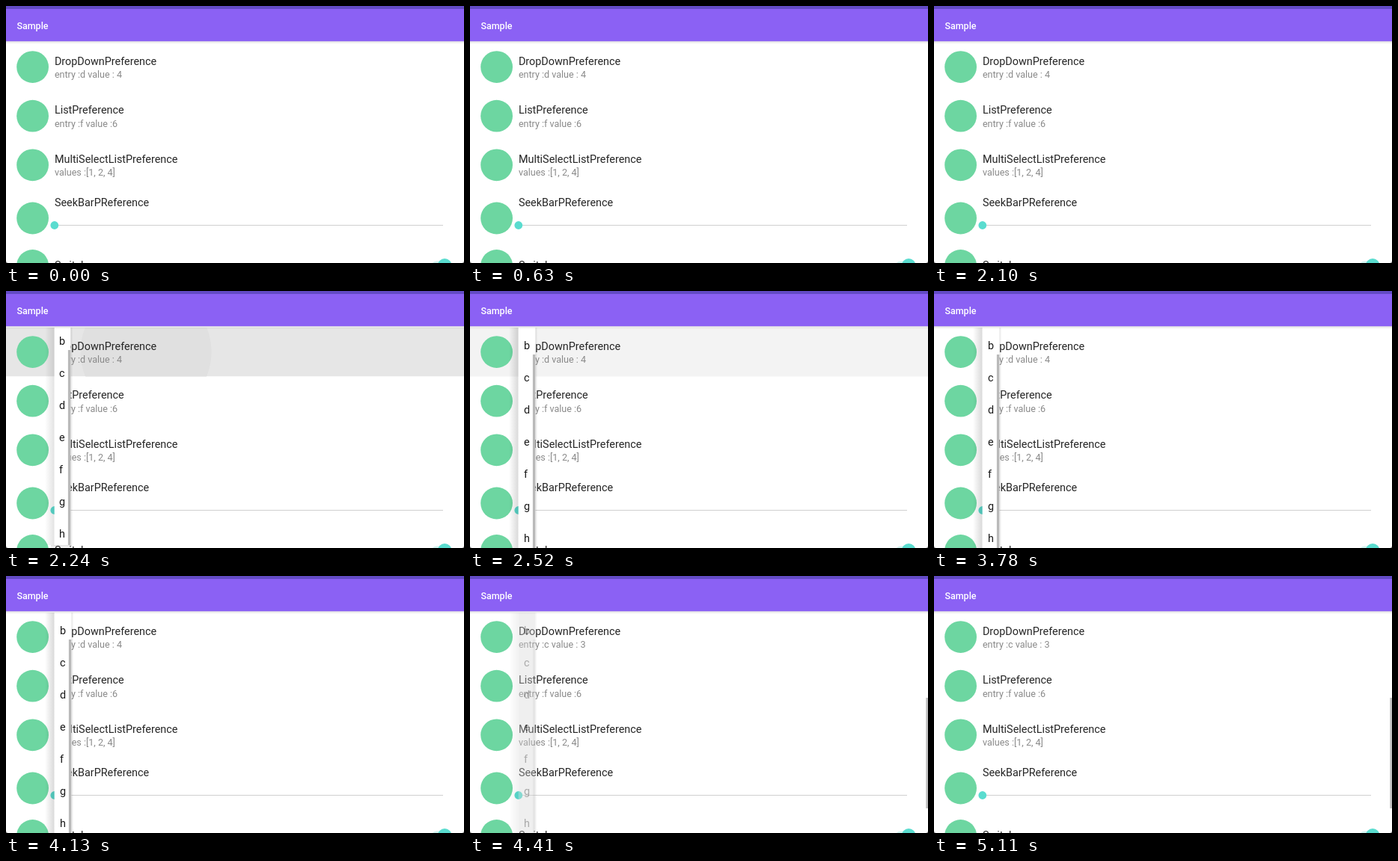
Recreate the animation shown at these times as an HTML page. Size 612 px wide and 344 px high, loop 5.46 s.

```html
<!DOCTYPE html>
<html lang="en">
<head>
<meta charset="utf-8">
<title>Sample</title>
<style>
  html, body { margin: 0; width: 100%; height: 100%; overflow: hidden; background: #fff; }
  svg { display: block; width: 612px; height: 344px; font-family: Roboto, sans-serif; }
  .title, .item { font-size: 14.4px; fill: #262626; }
  .item { fill: #1a1a1a; }
  .note { font-size: 12.55px; fill: #8a8a8a; }
  .bar { font-size: 12.5px; font-weight: 500; fill: #fff; }
</style>
</head>
<body>
<svg id="stage" viewBox="0 0 612 344" xmlns="http://www.w3.org/2000/svg">
  <defs>
    <linearGradient id="drop" x2="0" y2="1">
      <stop offset="0" stop-opacity=".12"/><stop offset="1" stop-opacity="0"/>
    </linearGradient>
    <linearGradient id="left">
      <stop offset="0" stop-opacity="0"/><stop offset=".4" stop-opacity=".06"/><stop offset="1" stop-opacity=".15"/>
    </linearGradient>
    <linearGradient id="right">
      <stop offset="0" stop-opacity=".12"/><stop offset="1" stop-opacity="0"/>
    </linearGradient>
    <clipPath id="rowClip"><rect y="49" width="612" height="65.4"/></clipPath>
    <clipPath id="popClip"><rect y="49" width="612" height="295"/></clipPath>
  </defs>
  <rect width="612" height="344" fill="#fff"/>
  <g id="press" clip-path="url(#rowClip)">
    <rect y="49" width="612" height="65.4" fill="#e6e6e6"/>
    <circle id="ripple" cx="187" cy="81.5" fill="#e0e0e0"/>
  </g>
  <g id="rows"></g>
  <path d="M65 293.5H584" stroke="#d0d0d0"/>
  <circle cx="64.8" cy="293.5" r="5.4" fill="#5adccf"/>
  <rect x="569" y="341.5" width="26" height="12" rx="6" fill="#d3f4f0"/>
  <circle cx="586.2" cy="347.4" r="9.3" fill="#5adccf"/>
  <rect id="scroll" x="609.3" y="163" width="2.7" height="148" fill="#bdbdbd"/>
  <g id="popup" clip-path="url(#popClip)">
    <rect id="shadeL" x="52" y="49" width="12.7" fill="url(#left)"/>
    <rect id="shadeR" y="49" width="3" fill="url(#right)"/>
    <rect id="shadeB" x="60" width="28" height="5" fill="url(#drop)"/>
    <rect id="sheet" x="64.7" y="49"/>
    <rect id="thumb" width="3.4" fill="#b9b9b9"/>
    <g id="items"></g>
  </g>
  <rect y="47" width="612" height="4" fill="url(#drop)"/>
  <rect width="612" height="47.2" fill="#8b61f4"/>
  <rect width="612" height="4" fill="#634bc5"/>
  <text class="bar" x="14.4" y="30.8">Sample</text>
  <path d="M0 341.5V344H2.5Q.5 343.5 0 341.5ZM612 341.5V344H609.5Q611.5 343.5 612 341.5Z" fill="#777"/>
</svg>
<script>
const LOOP = 5460, STEP = 70;
const OPEN = 2240, CHOSEN = 4270, CLOSED = 4550;
const LEFT = 64.7, TOP = 49;
const $ = id => document.getElementById(id);
const clamp = v => Math.max(0, Math.min(1, v));
const ease = v => 1 - (1 - v) ** 3;

function add(parent, tag, attrs, text = "") {
  const el = document.createElementNS("http://www.w3.org/2000/svg", tag);
  set(el, attrs);
  el.textContent = text;
  return parent.appendChild(el);
}

function set(el, attrs) {
  for (const key in attrs) el.setAttribute(key, attrs[key]);
}

// icon centre, title baseline, title, summary
const notes = [
  [81.6, 78.8, "DropDownPreference", "entry :d value : 4"],
  [147.2, 144.3, "ListPreference", "entry :f value :6"],
  [212.8, 209.8, "MultiSelectListPreference", "values :[1, 2, 4]"],
  [284, 268.2, "SeekBarPReference", ""],
  [347.5, 352.3, "Switch", ""]
].map(([cy, y, title, note]) => {
  add($("rows"), "circle", { cx: 35.6, cy, r: 21.4, fill: "#6dd6a1" });
  add($("rows"), "text", { class: "title", x: 64.9, y }, title);
  return add($("rows"), "text", { class: "note", x: 64.9, y: y + 17.6 }, note);
});

[..."bcdefgh"].forEach((letter, i) =>
  add($("items"), "text", { class: "item", x: 72, y: 77.8 + 43 * i }, letter));

function show(id, on) {
  $(id).style.display = on ? "" : "none";
}

function drawPress(t) {
  const fade = 1 - clamp((t - OPEN - STEP) / 350);
  show("press", t >= OPEN && fade > 0);
  set($("press"), { opacity: fade });
  set($("ripple"), { r: 87.5 + 340 * ease(clamp((t - OPEN) / 280)) });
}

function drawPopup(t) {
  show("popup", t >= OPEN && t < CLOSED);
  const rest = 1 - ease(clamp((t - OPEN) / 280));
  const dy = -6 * rest, edge = 87.3 - rest, bottom = 346 + dy;
  const gone = clamp((t - CHOSEN) / 220);
  const tone = Math.round(255 - 45 * clamp(gone * 1.5));
  set($("popup"), { opacity: 1 - gone });
  set($("sheet"), { width: edge - LEFT, height: bottom - TOP, fill: `rgb(${tone},${tone},${tone})` });
  set($("shadeL"), { height: bottom - TOP, opacity: 1 - 0.25 * rest });
  set($("shadeR"), { x: edge, height: bottom - TOP });
  set($("shadeB"), { y: bottom });
  set($("thumb"), { x: edge - 3.4, y: 85 + dy, height: bottom - 85 - dy });
  set($("items"), { transform: `translate(${-rest} ${dy})` });
}

function draw(now) {
  const t = Math.floor((now % LOOP) / STEP) * STEP;
  const chosen = t >= CHOSEN;
  notes[0].textContent = chosen ? "entry :c value : 3" : "entry :d value : 4";
  show("scroll", chosen);
  drawPress(t);
  drawPopup(t);
}

const start = performance.now();
function tick() {
  draw(performance.now() - start);
  requestAnimationFrame(tick);
}
tick();
</script>
</body>
</html>
```
